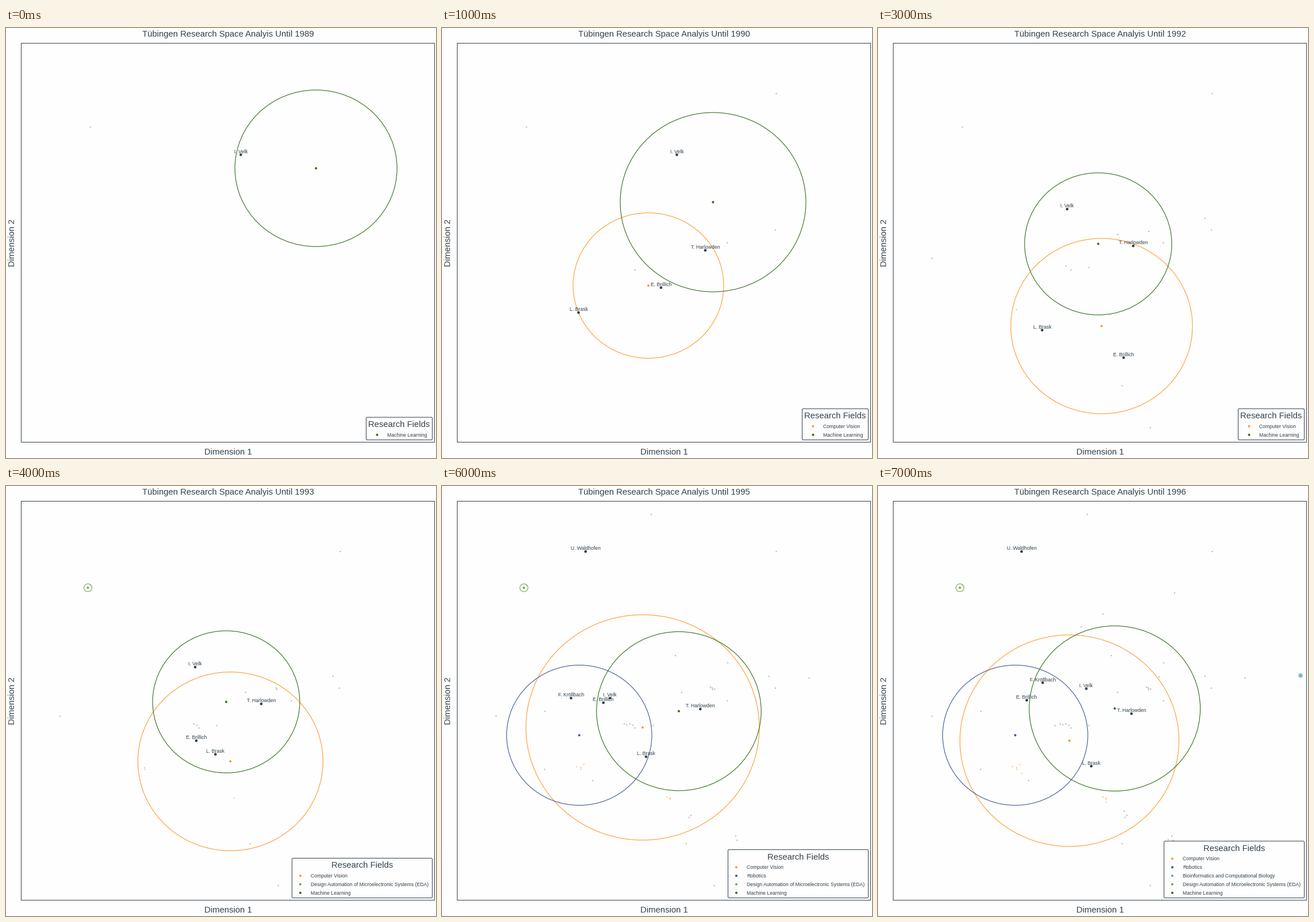
A matplotlib script that plays this animation: 748x748 px, repeating every 8000 ms.

```python
import numpy as np
import matplotlib.pyplot as plt
from matplotlib.animation import FuncAnimation
from matplotlib.patches import Ellipse, FancyBboxPatch, Rectangle

SIZE, DPI = 748, 100
PT = 72 / DPI                 # points per pixel
ASPECT = 0.9655               # height to width of the field outlines
FIRST_YEAR, YEARS = 1989, 8
ROW = 14.85                   # legend line height
INK, GREY, ORANGE = "#32414b", "#7d857d", "#ff9b32"

plt.rcParams["font.family"] = "Liberation Sans"

# Tracks hold key places; a place lasts until the next key year.
# name: colour, {year: (x, y, x radius)}, in legend order
FIELDS = {
    "Computer Vision": (ORANGE, {
        1990: (359, 448, 131), 1991: (372, 490, 153),
        1992: (389, 518.5, 158), 1993: (390.4, 479, 161),
        1995: (349, 420, 203), 1996: (333, 443, 190.5)}),
    "Robotics": ("#415a8c", {1995: (238.7, 433.5, 126.3)}),
    "Bioinformatics and Computational Biology": (
        "#50aac8", {1996: (735, 329.7, 3.2)}),
    "Design Automation of Microelectronic Systems (EDA)": (
        "#7da54b", {1993: (142.5, 177, 7)}),
    "Machine Learning": ("#326e1e", {
        1989: (539.2, 244, 141), 1990: (471.5, 303, 161.5),
        1991: (392, 368, 134), 1992: (383, 375.5, 128),
        1994: (413.5, 393.2, 135.5), 1995: (412, 391.7, 143.2),
        1996: (411.8, 387, 148.8)}),
}

# invented researchers: {year: (x, y)}
PEOPLE = {
    "I. Velk": {1989: (408.5, 220.5), 1992: (329, 315), 1994: (326.7, 340),
                1995: (292, 369), 1996: (362.3, 352.5)},
    "T. Harlowden": {1990: (458, 386.7), 1992: (444, 379),
                     1994: (473.5, 387.7), 1995: (449.3, 388),
                     1996: (441, 396)},
    "E. Brillich": {1990: (381, 451.7), 1992: (427.3, 573.5),
                    1993: (331, 443), 1995: (280.7, 377),
                    1996: (258.7, 372.7)},
    "L. Brask": {1990: (237.5, 495), 1992: (285.5, 525.5),
                 1993: (364.3, 466.7), 1995: (355, 471),
                 1996: (371, 487.3)},
    "U. Waldhofen": {1995: (249.7, 114)},
    "F. Kröllbach": {1995: (224.5, 369), 1996: (286.5, 342.2)},
}

# single papers by year
LONE = {
    1989: [(147, 172.5)],
    1990: [(581.5, 114), (496.5, 373.5), (335.7, 421), (580, 351.5)],
    1991: [(94, 400.5), (569, 331), (367, 416.7), (473.7, 695.3)],
    1992: [(416.8, 359), (424.7, 622.3)],
    1994: [(364, 49.5), (497, 307.5), (638.7, 334.3)],
    1995: [(406, 295), (179, 392), (178.5, 493), (262, 512.5)],
    1996: [(516, 186), (391.7, 223), (353.5, 245)],
}

# topics that gain papers every year: first year, x, y, colour
TOPICS = [(1992, 327, 414, GREY), (1992, 471, 354, GREY),
          (1992, 241, 490, ORANGE), (1993, 397, 543, ORANGE),
          (1994, 433, 573, GREY), (1994, 511, 609, GREY)]

fig = plt.figure(figsize=(SIZE / DPI, SIZE / DPI), dpi=DPI,
                 facecolor="#fefefe")
ax = fig.add_axes([0, 0, 1, 1])


def at(track, year):
    """Latest place on a track, or None before its start."""
    past = [y for y in track if y <= year]
    return track[max(past)] if past else None


def dot(x, y, diameter, color, **kw):
    ax.add_patch(Ellipse((x, y), diameter, diameter, facecolor=color,
                         linewidth=0, **kw))


def text(x, y, s, px, ha="center", **kw):
    ax.text(x, y, s, fontsize=px * PT, color=INK, ha=ha, va="baseline", **kw)


def draw_frame(year):
    ax.add_patch(Rectangle((26.5, 26.5), 719, 694, fill=False, snap=False,
                           edgecolor=INK, linewidth=PT))
    text(386.5, 15, f"Tübingen Research Space Analyis Until {year}", 14.9)
    text(386.3, 742.3, "Dimension 1", 14.9)
    text(15.5, 374, "Dimension 2", 14.9, rotation=90, rotation_mode="anchor")


def draw_papers(year):
    for first, places in LONE.items():
        if first <= year:
            for x, y in places:
                dot(x, y, 2.5, GREY, alpha=0.5, zorder=2)
    rng = np.random.default_rng(4)
    for first, x, y, color in TOPICS:
        # each later paper strays a little further from its topic
        steps = rng.normal(0, 3, (YEARS, 2)) * np.arange(YEARS)[:, None]
        for dx, dy in steps[:max(0, year - first + 1)]:
            dot(x + dx, y + dy, 2.5, color, alpha=0.5, zorder=2)


def draw_fields(year):
    shown = []
    for name, (color, track) in FIELDS.items():
        place = at(track, year)
        if place:
            x, y, r = place
            ax.add_patch(Ellipse((x, y), 2 * r, 2 * r * ASPECT, fill=False,
                                 edgecolor=color, linewidth=1.1 * PT,
                                 zorder=3))
            dot(x, y, 4, color, zorder=4)
            shown.append((name, color))
    return shown


def draw_people(year):
    for name, track in PEOPLE.items():
        place = at(track, year)
        if place:
            x, y = place
            dot(x, y, 4.6, INK, zorder=5)
            text(x, y - 2.6, name, 8.6, zorder=6)


def draw_legend(rows):
    wide = any("EDA" in name for name, _ in rows)
    left, right, bottom = (497.5 if wide else 626.5), 741.5, 716.5
    top = 692 - ROW * len(rows)
    ax.add_patch(FancyBboxPatch(
        (left, top), right - left, bottom - top,
        boxstyle="round,pad=0,rounding_size=2", facecolor="#fefefe",
        edgecolor=INK, linewidth=PT, snap=False, zorder=7))
    text((left + right) / 2, top + 17, "Research Fields", 14.8, zorder=8)
    dot_x, label_x = left + (14.5 if wide else 19), left + (32.3 if wide else 37)
    for i, (name, color) in enumerate(reversed(rows)):
        y = 707.7 - ROW * i
        dot(dot_x, y, 4, color, zorder=8)
        text(label_x, y + 3, name, 8.6, ha="left", zorder=8)


def draw(i):
    year = FIRST_YEAR + i
    ax.clear()
    ax.set_xlim(0, SIZE)
    ax.set_ylim(SIZE, 0)
    ax.axis("off")
    draw_frame(year)
    draw_papers(year)
    draw_people(year)
    draw_legend(draw_fields(year))
    return []


anim = FuncAnimation(fig, draw, frames=YEARS, init_func=lambda: [],
                     interval=1000, repeat=True, repeat_delay=0)
plt.show()
```
